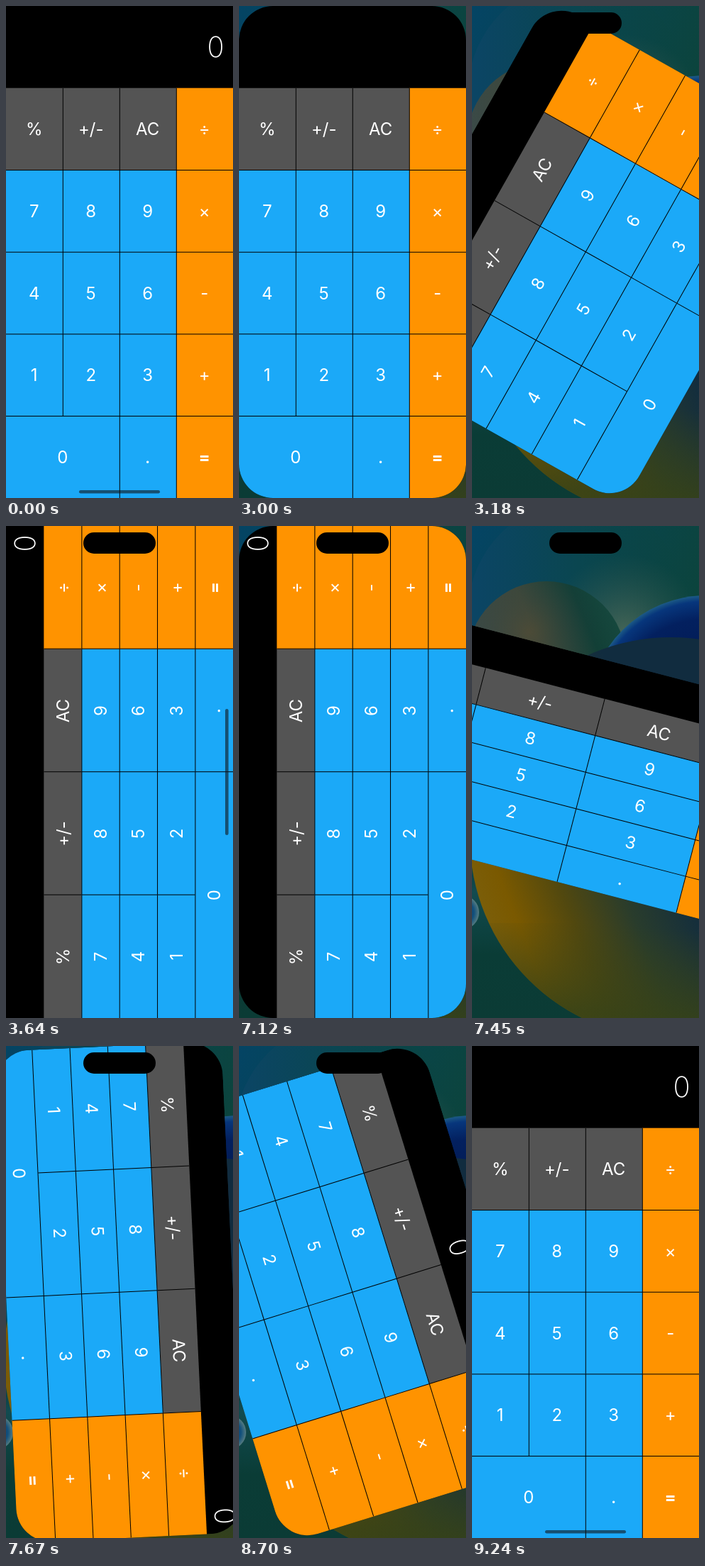
Recreate the animation shown at these times as an HTML page with a canvas. Size 320 by 694 pixels, loop 9.27 s.

```html
<!DOCTYPE html>
<html lang="en">
<head>
<meta charset="utf-8">
<title>Calculator rotation</title>
<style>
  html, body { margin: 0; width: 100%; height: 100%; overflow: hidden; background: #000; }
  canvas { display: block; width: 100%; height: 100%; }
</style>
</head>
<body>
<canvas id="stage"></canvas>
<script>
const W = 320, H = 694, LOOP = 9270, FADE = 320;
const FONT = 'Inter, "Open Sans", sans-serif';
const BLUE = '#1ba9f8', GRAY = '#545454', ORANGE = '#ff9300';
const ROWS = ['% +/- AC ÷', '7 8 9 ×', '4 5 6 -', '1 2 3 +', '0 . ='].map(r => r.split(' '));

// Each turn: start, duration, angles in degrees, landscape share (0 = portrait, 1 = landscape)
const TURNS = [
  { at: 3000, dur: 300, angle: [0, -90], wide: [0, 1] },
  { at: 7121, dur: 603, angle: [-90, 90], wide: [1, 1] },
  { at: 8610, dur: 300, angle: [90, 0], wide: [1, 0] }
];

const canvas = document.getElementById('stage');
const ctx = canvas.getContext('2d');
const dpr = window.devicePixelRatio || 1;
canvas.width = W * dpr;
canvas.height = H * dpr;

const lerp = (a, b, p) => a + (b - a) * p;
const clamp = v => Math.min(1, Math.max(0, v));

// cubic-bezier(.42, 0, .58, 1)
function easeInOut(x) {
  let lo = 0, hi = 1;
  for (let i = 0; i < 24; i++) {
    const s = (lo + hi) / 2, q = 1 - s;
    if (1.26 * q * q * s + 1.74 * q * s * s + s * s * s < x) lo = s; else hi = s;
  }
  return lo * lo * (3 - 2 * lo);
}

function poseAt(t) {
  const pose = { angle: 0, wide: 0, target: 0, turning: false, bar: 1 };
  for (const { at, dur, angle, wide } of TURNS) {
    if (t < at) break;
    const p = easeInOut(clamp((t - at) / dur));
    pose.angle = lerp(angle[0], angle[1], p);
    pose.wide = lerp(wide[0], wide[1], p);
    pose.target = wide[1];
    pose.turning = t < at + dur;
    pose.bar = clamp((t - at - dur) / FADE);
  }
  return pose;
}

function linear(x0, y0, x1, y1, stops) {
  return addStops(ctx.createLinearGradient(x0, y0, x1, y1), stops);
}

function radial(x, y, r, stops) {
  return addStops(ctx.createRadialGradient(x, y, 0, x, y, r), stops);
}

function addStops(gradient, stops) {
  for (const [at, color] of stops) gradient.addColorStop(at, color);
  return gradient;
}

function disc(x, y, r, fill) {
  ctx.beginPath();
  ctx.arc(x, y, r, 0, Math.PI * 2);
  ctx.fillStyle = fill;
  ctx.fill();
}

function pill(x, y, w, h, fill) {
  ctx.beginPath();
  ctx.roundRect(x, y, w, h, Math.min(w, h) / 2);
  ctx.fillStyle = fill;
  ctx.fill();
}

function drawBackdrop() {
  ctx.fillStyle = linear(0, 0, W, 120, [[0, '#044464'], [0.5, '#08454f'], [1, '#0c443c']]);
  ctx.fillRect(0, 0, W, H);
  disc(150, 120, 155, linear(0, 60, 300, 60, [[0, '#0b4565'], [0.5, '#0a4650'], [1, 'rgba(12,68,60,0)']]));
  disc(215, 150, 110, radial(215, 150, 110, [[0, 'rgba(88,112,92,.75)'], [1, 'rgba(60,90,80,0)']]));
  disc(105, 190, 112, linear(20, 200, 210, 120, [[0, '#3d4b47'], [0.4, '#40493a'], [0.75, '#123f36'], [1, '#174a40']]));
  disc(105, 190, 112, radial(80, 150, 100, [[0, 'rgba(84,76,52,.6)'], [1, 'rgba(30,60,70,0)']]));
  disc(330, 265, 167, radial(330, 265, 167, [[0, '#021546'], [0.8, '#03205f'], [0.95, '#07367c'], [1, '#1c5a86']]));
  ctx.fillStyle = linear(0, 470, 0, H, [[0, 'rgba(14,58,56,0)'], [0.2, '#124b50'], [0.6, '#0a3c36'], [1, '#0b3b35']]);
  ctx.fillRect(0, 440, W, H - 440);
  disc(-14, 545, 24, radial(-14, 545, 24, [[0, '#0a3266'], [0.7, '#12507c'], [1, '#547b80']]));
  disc(280, 440, 283, linear(20, 640, 320, 520,
    [[0, '#7c6210'], [0.22, '#7a5900'], [0.45, '#51480f'], [0.7, '#293c2c'], [1, '#112c3f']]));
  ctx.fillStyle = linear(300, 570, 290, H, [[0, 'rgba(54,66,24,0)'], [1, 'rgba(54,66,24,.85)']]);
  ctx.save();
  ctx.beginPath();
  ctx.arc(280, 440, 283, 0, Math.PI * 2);
  ctx.clip();
  ctx.fillRect(0, 560, W, H - 560);
  ctx.restore();
}

function label(text, x, y, size, weight) {
  ctx.font = `${weight} ${size}px ${FONT}`;
  ctx.fillText(text, x, y + size * 0.364);
}

function drawKeys(w, h) {
  const cw = w / 4, ch = h / 6;
  ROWS.forEach((row, r) => {
    const y = (r + 1) * ch;
    let x = 0;
    row.forEach((key, i) => {
      const kw = key === '0' ? cw * 2 : cw;
      const last = i === row.length - 1;
      ctx.fillStyle = last ? ORANGE : r ? BLUE : GRAY;
      ctx.fillRect(x, y, kw + 0.5, ch + 0.5);
      ctx.fillStyle = '#000';
      if (i) ctx.fillRect(x - 0.2, y, 1, ch);
      if (r) ctx.fillRect(x, y - 0.3, kw, 1);
      x += kw;
    });
    x = 0;
    ctx.fillStyle = '#fff';
    for (const key of row) {
      const kw = key === '0' ? cw * 2 : cw;
      const lift = key === '-' ? 1 : 0;
      const weight = key === '=' ? 700 : key === '.' ? 500 : 400;
      label(key, x + kw / 2 - 0.3, y + ch / 2 - lift, 24, weight);
      x += kw;
    }
  });
}

function drawApp({ angle, wide, target, turning, bar }) {
  const w = lerp(W, H, wide), h = lerp(H, W, wide);
  ctx.save();
  ctx.translate(W / 2, H / 2);
  ctx.rotate(angle * Math.PI / 180);
  ctx.translate(-w / 2, -h / 2);
  ctx.beginPath();
  ctx.roundRect(0, 0, w, h, turning ? 48 : 0);
  ctx.clip();
  ctx.fillStyle = '#000';
  ctx.fillRect(0, 0, w, h);
  ctx.textAlign = 'center';
  drawKeys(w, h);
  // The readout takes its final offset as soon as a turn begins
  ctx.fillStyle = '#fff';
  label('0', lerp(W, H, target) - 24.5, h / 12, 40, 200);
  if (bar > 0) {
    const len = lerp(114, 178, wide);
    ctx.globalAlpha = bar;
    pill((w - len) / 2, h - 11, len, 4.6, 'rgba(18,16,18,.58)');
  }
  ctx.restore();
}

function frame(now) {
  const pose = poseAt(now % LOOP);
  ctx.setTransform(dpr, 0, 0, dpr, 0, 0);
  if (pose.turning) drawBackdrop();
  drawApp(pose);
  pill(109, 9, 102, 30, '#000');
  requestAnimationFrame(t => frame(Math.max(0, t - start)));
}

const start = performance.now();
frame(0);
</script>
</body>
</html>
```
